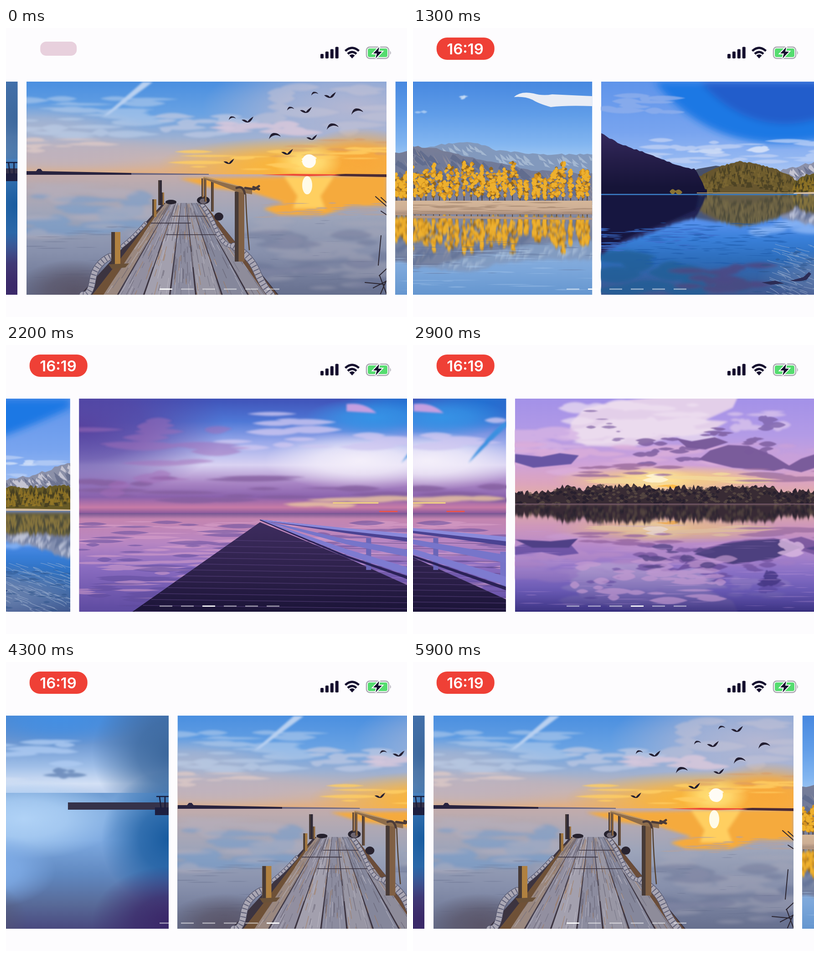
These frames come from a looping animation (880x636 px, 6 s). An HTML page:

```html
<!DOCTYPE html>
<html lang="en">
<head>
<meta charset="utf-8">
<title>Photo carousel</title>
<style>
html, body { margin: 0; width: 100%; height: 100%; overflow: hidden; background: #fdfcfe; }
svg { display: block; }
text { font: 600 33px Inter, Roboto, sans-serif; }
</style>
</head>
<body>
<svg id="stage" width="880" height="636" viewBox="0 0 880 636"></svg>
<script>
const TOP = 118, W = 790, H = 469, PITCH = 809.5, COUNT = 6;
const defs = [];
let uid = 0, seed = 1;

function rng() {
  let s = seed++ * 7919;
  return () => {
    s = (s + 0x6D2B79F5) | 0;
    let t = Math.imul(s ^ (s >>> 15), 1 | s);
    t = (t + Math.imul(t ^ (t >>> 7), 61 | t)) ^ t;
    return ((t ^ (t >>> 14)) >>> 0) / 4294967296;
  };
}
const f = v => v.toFixed(1);
const parse = s => s.split(' ').map(p => p.split(',').map(Number));

// Drawing helpers, each returns markup.
const path = (d, fill, op = 1) => `<path d="${d}" fill="${fill}" opacity="${op}"/>`;
const line = (d, col, w = 1, op = 1, more = 'stroke-linecap="round"') =>
  `<path d="${d}" fill="none" stroke="${col}" stroke-width="${w}" opacity="${op}" ${more}/>`;
const poly = (p, fill, op = 1) => `<polygon points="${p}" fill="${fill}" opacity="${op}"/>`;
const box = (x, y, w, h, fill) => `<rect x="${x}" y="${y}" width="${w}" height="${h}" fill="${fill}"/>`;
const oval = (x, y, rx, ry, fill) => `<ellipse cx="${x}" cy="${y}" rx="${rx}" ry="${ry}" fill="${fill}"/>`;
const soft = (n, s) => `<g filter="url(#soft${n})">${s}</g>`;
const view = (x, y, h, s) => `<svg x="${x}" y="${y}" width="${W}" height="${h}" viewBox="${x} ${y} ${W} ${h}">${s}</svg>`;
const flip = (id, axis, more = 'filter="url(#smear)"') =>
  `<use href="#${id}" transform="matrix(1 0 0 -1 0 ${2 * axis})" ${more}/>`;
const stops = s => s.split(',').map(p => {
  const [c, o] = p.split(' ');
  return `<stop offset="${o}" stop-color="${c}"/>`;
}).join('');

// Gradient running down from y1 to y2.
function down(y1, y2, s) {
  const id = 'g' + uid++;
  defs.push(`<linearGradient id="${id}" gradientUnits="userSpaceOnUse" x1="0" x2="0" y1="${y1}" y2="${y2}">${stops(s)}</linearGradient>`);
  return `url(#${id})`;
}
function glow(x, y, rx, ry, col) {
  const id = 'g' + uid++;
  defs.push(`<radialGradient id="${id}">${stops(`${col} 0,${col}bb .45,${col}00 1`)}</radialGradient>`);
  return oval(x, y, rx, ry, `url(#${id})`);
}
const lens = (x, y, rx, ry) =>
  `M${f(x - rx)} ${f(y)}q${f(rx)} ${f(-2 * ry)} ${f(2 * rx)} 0q${f(-rx)} ${f(2 * ry)} ${f(-2 * rx)} 0z`;

// Random lens shapes inside a box.
function spread(n, x0, y0, x1, y1, rx, ry, fill, op = .8) {
  const r = rng();
  let d = '';
  while (n--) {
    const k = .3 + r();
    d += lens(x0 + (x1 - x0) * r(), y0 + (y1 - y0) * r(), rx * k, ry * (.4 + r()));
  }
  return path(d, fill, op);
}
function heightAt(p, x) {
  let i = 1;
  while (i < p.length - 1 && p[i][0] < x) i++;
  const [a, b] = p[i - 1], [c, d] = p[i];
  return b + (d - b) * (x - a) / (c - a);
}
// Rough skyline closed along a base line.
function ridge(s, rough, step, base, fill) {
  const p = parse(s), r = rng(), x0 = p[0][0], x1 = p[p.length - 1][0];
  let d = `M${x0} ${base}`;
  for (let x = x0; x <= x1; x += step) d += `L${x} ${f(heightAt(p, x) + (r() - .5) * rough)}`;
  return path(d + `H${x1}V${base}z`, fill);
}
// Shards hanging under a skyline: rock faces or tree tops.
function shards(s, n, depth, shape, fill, op = .65) {
  const p = parse(s), r = rng(), x0 = p[0][0], span = p[p.length - 1][0] - x0;
  let d = '';
  while (n--) {
    const x = x0 + span * r();
    d += `M${f(x)} ${f(heightAt(p, x) + depth * r())}${shape}`;
  }
  return path(d, fill, op);
}

function sunsetJetty() {
  let s = box(45, 118, W, 205, down(118, 322, '#4a8fe0 0,#69a2e3 .35,#9bb0d3 .6,#cdb5ab .82,#e2ae80 1'))
    + glow(760, 175, 330, 120, '#b4b7d2') + glow(60, 225, 250, 60, '#a9b5d0') + glow(110, 280, 330, 45, '#bfb2bd')
    + soft(2, spread(34, 40, 150, 330, 240, 60, 6, '#c3d5ee', .5) + spread(14, 330, 190, 520, 235, 45, 6, '#b9c6e2')
    + spread(12, 470, 200, 660, 235, 45, 6, '#dccadb') + spread(14, 560, 130, 830, 230, 60, 9, '#c6c3d5', .5)
    + spread(12, 45, 245, 210, 272, 50, 4, '#dcc9c6') + path('M214 194L300 119H322L226 190z', '#b9d0f0'))
    + glow(665, 300, 330, 62, '#ffb52c') + glow(780, 290, 140, 70, '#f8a83a') + glow(663, 295, 75, 42, '#ffe27c')
    + soft(1, spread(20, 400, 262, 835, 312, 55, 3, '#ffcf62') + spread(12, 600, 240, 835, 285, 35, 3, '#d99a62', .5))
    + oval(665, 293, 15, 15, '#fffdf5') + spread(6, 655, 282, 675, 304, 11, 5, '#fffdf5');

  s += box(45, 322, W, 265, down(322, 587, '#c3acab 0,#b2a9b3 .14,#9ca4ba .36,#8790ac .65,#666f8e 1'))
    + soft(3, spread(22, 60, 370, 330, 450, 65, 10, '#6f9bd0', .5) + spread(20, 50, 335, 340, 470, 60, 7, '#b6afbd', .5)
    + spread(28, 560, 410, 835, 580, 65, 9, '#a9a8b9', .4) + spread(20, 540, 450, 835, 580, 60, 9, '#656f91', .4)
    + poly('380,331 835,325 835,392 760,392 695,412 600,412 565,398 610,384 540,362 450,352', '#f5aa3e')
    + poly('610,326 720,326 690,370 700,397 630,397 640,370', '#ffcf60'))
    + spread(40, 560, 385, 835, 420, 28, 1.6, '#b7a29c', .6) + spread(70, 50, 420, 835, 580, 30, 1, '#59617f', .25)
    + oval(661, 346, 11, 20, '#fffbe8') + glow(150, 580, 130, 70, '#5a5568')
    + path('M45 315H66l4-5h6l4 5 195 4v4H45z', '#28233f') + path('M275 319l170 2v2H275z', '#6c6680')
    + path('M700 323l45-2 90 1v6l-100-2z', '#4b2b35') + path('M560 323l70-2 90 1 15 2-70 2z', '#ee4a38');

  // Deck planks fan out between two edges.
  const r = rng();
  const pt = (u, v) => f(350 + 80 * u + v * (320 * u - 160)) + ',' + f(385 + 202 * v);
  s += poly('345,385 433,385 598,587 163,587', '#3c3440');
  ['#9a8880', '#928fa0', '#a3a0ae', '#8c8c9f', '#9896a4', '#85879b', '#8e8c9a'].forEach((c, i) => {
    const a = i / 7, b = a + .134;
    s += poly([pt(a, 0), pt(b, 0), pt(b, 1), pt(a, 1)].join(' '), c);
  });
  for (const col of ['#5a5566', '#c2bfca', '#a57852', '#6d6b7e']) {
    let d = '';
    for (let i = 0; i < 75; i++) { const u = r(), v = r(); d += `M${pt(u, v)}L${pt(u, Math.min(1, v + .05 + r() * .12))}`; }
    s += line(d, col, 1.3, .6);
  }
  s += line(`M${pt(.3, .145)}L${pt(1, .145)}M${pt(0, .22)}L${pt(.6, .22)}M${pt(.3, .345)}L${pt(1, .345)}`, '#3a3340', 1.6)
    + poly('330,405 337,400 214,587 190,587', '#6f5137') + poly('428,385 434,385 595,587 570,587', '#6b4d39');

  const rope = (d, w) => line(d, '#4d4f68', w + 2) + line(d, '#aaa7b4', w) + line(d, '#5f6078', w - 1, 1, 'stroke-dasharray="2 7"');
  s += rope('M306 430Q280 460 255 480', 6) + rope('M228 503Q195 520 190 555T168 587', 13)
    + rope('M428 386Q448 410 462 445T500 480', 8) + rope('M500 480Q535 500 550 535T582 587', 14)
    + oval(362, 383, 12, 5, '#25212d') + oval(433, 379, 14, 9, '#25212d') + oval(433, 381, 8, 6, '#6d6570') + oval(467, 415, 10, 9, '#28232f');
  const post = (x, y, w, h, c) => box(x, y, w, h, c) + box(x, y, w * .4, h, '#463a37');
  s += post(334, 335, 8, 55, '#302a36') + post(342, 362, 5, 27, '#9d7340') + post(321, 377, 9, 39, '#a1763e')
    + post(429, 331, 5, 42, '#9a7045') + post(435, 328, 5, 54, '#8d6740') + post(450, 336, 6, 68, '#69503c')
    + post(231, 449, 20, 78, '#b08140') + poly('225,520 270,518 262,527 232,530', '#6a5138') + post(502, 360, 21, 154, '#806044')
    + poly('433,327 440,328 540,355 540,366 505,360 434,332', '#8e6d4b') + line('M434 328L538 355', '#c69f6c', 2)
    + line('M506 352Q520 346 524 364M525 352l20 3 10-7M543 350l12 5', '#4b3b38', 5) + line('M526 366Q528 430 534 488', '#54402f', 2.5);

  const bird = (d, list) => parse(list).map(([x, y, k]) =>
    `<path d="${d}" fill="#221d30" transform="translate(${x} ${y}) scale(${k})"/>`).join('');
  return s + bird('M-13 1q8-2 13 4q5-7 13-11q-6 14-13 13q-6 0-13-6z', '711,147,1 658,180,1 530,201,1 671,240,.9 617,272,1 489,293,.9')
    + bird('M-12 8q3-15 12-14q9 0 14 8q-7-4-13-3q-9 2-13 9z', '677,144,.6 624,177,.6 770,183,1 716,216,1 496,198,.6 589,237,1')
    + line('M835 392L811 371M835 384l-12-11M835 411l-12-8M817 522l6-65M788 560l42 4M835 530l-16 15M835 585l-15-40M822 585l12-28M806 572l29-15', '#2b2530', 2);
}

function goldenTrees() {
  const far = '590,268 640,256 690,252 720,255 760,270 850,278 969,278';
  const near = '179,276 210,268 330,266 370,256 390,259 430,246 512,243 560,258 620,264 680,280 760,297 830,312 969,322';
  const hills = ridge(far, 4, 8, 390, '#8299bd') + shards(far, 60, 18, 'l16 14l-12-3z', '#c5d5e6', .5)
    + ridge(near, 4, 8, 390, down(243, 390, '#7d8096 0,#707a99 .4,#7d8199 1'))
    + shards(near, 130, 75, 'l22 20l-8 2l-20-12z', '#515e84', .5) + shards(near, 90, 60, 'l15 22l-6-4z', '#a39a9c', .55);
  const r = rng(), cols = ['#92661f', '#d5931f', '#eeb02d'], leaf = ['', '', ''];
  let trunks = '';
  for (let x = 182; x < 970; x += 8 + r() * 9) {
    const thin = x > 600 && r() < .45, h = 48 + r() * 42, w = thin ? 6 : 10 + r() * 8, base = 381 + r() * 5;
    trunks += `M${f(x)} ${f(base)}l${f(r() * 5 - 2)} ${f(-h * .6)}`;
    for (let i = 0; i < 42; i++) {
      const v = r(), k = Math.sin(Math.PI * (.12 + v * .85));
      leaf[i % 3] += lens(x + (r() + r() - 1) * w * k, base - h + v * h * .82, 3 + r() * 2, 2 + r() * 3);
    }
  }
  const wood = line(trunks, '#4c3728', 1.6) + leaf.map((d, i) => path(d, cols[i])).join('');
  return box(179, 118, W, 290, down(118, 300, '#4788e0 0,#609de8 .4,#82b5f0 .75,#a9cdf3 1'))
    + soft(1, spread(5, 400, 128, 412, 136, 9, 4, '#cfe2f8') + spread(5, 680, 150, 692, 156, 9, 3, '#e3edf9')
    + spread(6, 275, 248, 310, 258, 9, 3, '#d5e5f8') + spread(5, 585, 182, 606, 186, 9, 2, '#b5d2f4'))
    + path('M797 152Q812 138 840 144Q860 150 881 146L969 150V172Q910 170 878 174Q850 166 838 158Q820 150 797 152z', '#e9edf5')
    + `<g id="hills">${hills}</g><g id="wood">${wood}</g>`
    + box(179, 380, W, 32, down(380, 412, '#d5b799 0,#cdae95 .6,#9b8275 1')) + spread(60, 179, 384, 969, 408, 35, 1.2, '#a98b74')
    + box(179, 411, W, 176, down(411, 587, '#a6bedf 0,#8eb2df .4,#7ba6da .7,#6596cf 1'))
    + view(179, 410, 177, flip('hills', 394, 'opacity=".85" filter="url(#smear)"') + flip('wood', 395))
    + spread(70, 179, 490, 969, 580, 45, 1.2, '#a6c6ea', .4) + spread(60, 179, 470, 969, 545, 35, 1.4, '#5f7099', .4)
    + path('M179 408q350 4 790 10v4q-500-4-790-10z', '#b49681') + line('M430 382q18 12 28 26', '#4a3728', 1.6);
}

function blueLake() {
  const left = '48,232 90,255 190,292 225,306 256,311 272,345 280,365';
  const mid = '252,350 258,330 300,307 350,293 390,299 430,310 470,328 484,362';
  const snow = '440,314 500,298 570,287 610,293 660,285 700,296 750,288 838,259';
  const wood = '470,340 490,324 560,320 620,314 838,311';
  const fir = 'l-4 14h8z';
  const land = poly('225,325 260,310 300,303 340,310 340,365 225,365', '#47506a')
    + ridge(snow, 6, 7, 365, '#8b90a8') + shards(snow, 90, 28, 'l14 18l-7-3l-10-6z', '#e4e1ea') + shards(snow, 90, 34, 'l16 14l-9 3z', '#5c6484')
    + ridge(mid, 3, 4, 365, '#67562e') + shards(mid, 230, 42, fir, '#40391f') + shards(mid, 160, 36, fir, '#8a7336', .55)
    + ridge(wood, 8, 4, 363, '#675a26') + shards(wood, 260, 32, fir, '#383420') + shards(wood, 180, 30, fir, '#a98628')
    + ridge(left, 3, 6, 365, down(232, 350, '#34295c 0,#241d48 .5,#161438 1'));
  const r = rng();
  let d = '';
  for (let i = 0; i < 230; i++) {
    d += `M${f(410 + r() * 428)} ${f(475 + r() * 110)}q12 ${f(1 + r() * 5)} ${f(16 + r() * 22)} ${f(8 + r() * 5)}`;
  }
  return box(48, 118, W, 250, down(118, 340, '#5f94ea 0,#78a4ef .5,#98baf2 .8,#c3d5f5 1'))
    + soft(8, path('M165 118Q270 250 430 253T838 138V118z', '#1c78e4') + path('M265 118Q340 205 440 211T690 118z', '#235dcb'))
    + soft(1, spread(14, 60, 148, 210, 192, 42, 5, '#8eaeec') + spread(24, 140, 245, 440, 295, 38, 4, '#bfd0f4')
    + spread(22, 450, 245, 838, 292, 40, 4, '#b7cdf6') + spread(5, 375, 262, 415, 270, 22, 5, '#e1e9f9')
    + spread(5, 250, 264, 310, 274, 24, 5, '#d5e0f7') + spread(5, 690, 254, 770, 268, 24, 4, '#d5e3f9'))
    + `<g id="land">${land}</g>`
    + box(48, 365, W, 222, down(365, 587, '#5c8ce0 0,#5590ec .28,#397fd8 .45,#2d6dbb .65,#355f9f .85,#42588f 1'))
    + soft(3, spread(24, 380, 410, 838, 450, 45, 7, '#8eb8f5') + spread(14, 60, 500, 400, 580, 70, 14, '#1f5f96')
    + spread(16, 220, 520, 400, 585, 40, 9, '#51467f') + glow(640, 545, 250, 65, '#6f84ae'))
    + view(48, 365, 222, flip('land', 365, 'opacity=".88" filter="url(#smear)"')
    + soft(2, poly('48,366 262,366 255,400 200,425 130,450 48,490', '#191640')))
    + spread(60, 50, 440, 290, 490, 22, 1.3, '#3d6fcb') + spread(110, 130, 425, 470, 520, 20, 1.1, '#1d58a8', .5)
    + line(d, '#a9bad6', 1.2, .55) + spread(90, 390, 490, 838, 585, 12, 2, '#2d5387', .5)
    + path('M462 556q18-4 30-8l12-11 5 4-10 13q-18 6-37 2zM400 560l30-4 20 6-30 3z', '#2c2c55') + line('M675 560l24-20', '#38528a', 3)
    + box(48, 365, 430, 2.5, '#3b7fc7') + path('M470 362q180-5 368 0v3H470z', '#d5bda0') + path('M258 362h214v2H258z', '#a8926a')
    + spread(7, 204, 357, 220, 362, 6, 4, '#a98b32');
}

function violetPier() {
  const bar = (a, b, w, c) => poly(`-190,384 0,${a} 203,${b} 203,${b + w} 0,${a + w * .6} -190,386`, c);
  let d = '';
  for (let y = 430; y < 587; y += 13) d += `M${-190 - (y - 390) * 1.4} ${y}L203 ${y + 8}`;
  return box(-587, 118, W, 252, down(118, 370, '#3f52b8 0,#4f78d6 .2,#9aa9ea .38,#d9d2f2 .58,#a884c4 .74,#8a62ac .86,#c77ba6 .95,#8b5a9c 1'))
    + glow(-587, 180, 320, 160, '#57439f') + glow(150, 125, 150, 60, '#2370d2') + glow(60, 160, 150, 45, '#3593e6') + glow(30, 255, 210, 65, '#f4effa')
    + soft(2, spread(20, -300, 150, 203, 230, 55, 6, '#cfc7f0') + spread(24, -587, 285, 203, 345, 80, 5, '#85609f')
    + spread(10, -100, 335, 203, 355, 80, 4, '#eac5a0') + spread(20, -587, 140, -200, 350, 70, 8, '#a46fb8', .5)
    + path('M203 180Q150 230 120 260Q160 200 203 165z', '#3a90e0') + path('M0 130Q40 125 66 150L0 146z', '#c49fe0'))
    + box(-30, 346, 100, 3, '#f0d080') + box(72, 365, 40, 2.5, '#f4523f')
    + box(-587, 370, W, 217, down(370, 587, '#755592 0,#c485b0 .06,#b886c2 .3,#8a6cc0 .55,#5d4aa0 1'))
    + spread(120, -587, 385, 203, 560, 60, 3, '#dba3cc', .5) + spread(120, -587, 390, 203, 585, 50, 4, '#5f4a9c', .5)
    + poly('-190,390 0,468 203,560 203,587 -470,587', down(390, 587, '#3d2c5e 0,#2c2049 .6,#1b1438 1')) + line(d, '#5a4480', 1.5, .6)
    + box(43, 425, 11, 70, '#6a66b8') + box(190, 455, 13, 82, '#7673c8')
    + bar(404, 425, 17, '#4a4292') + bar(403, 422, 10, '#8a89da') + bar(428, 462, 18, '#7775ca') + bar(449, 510, 20, '#7e7bd0') + bar(463, 532, 8, '#2b2257');
}

function purpleClouds() {
  const trees = '222,324 290,324 330,311 375,318 405,307 440,312 500,310 545,318 600,313 740,312 772,306 800,320 880,322 930,317 1012,308';
  const dark = '#7a5b9b';
  const sky = box(222, 118, W, 233, down(118, 350, '#a391e8 0,#b39be6 .35,#cfa2d8 .62,#dca4bd .8,#e5b49a 1'))
    + soft(2, poly('340,205 345,170 375,140 440,124 560,112 712,112 700,138 640,165 690,168 640,195 560,205 470,225 380,222', '#e3cfe9')
    + spread(45, 350, 125, 690, 215, 45, 8, '#f0e1f1', .7) + spread(20, 222, 175, 350, 235, 45, 6, '#d6b3e4')
    + spread(30, 240, 215, 680, 280, 55, 6, '#dbaeda') + spread(14, 700, 140, 810, 190, 30, 7, '#d9c3ec')
    + spread(22, 700, 215, 1000, 285, 45, 6, '#c9a0da') + spread(6, 952, 118, 966, 145, 10, 6, '#dac5ee'))
    + glow(560, 296, 260, 32, '#f6cf82') + glow(530, 296, 90, 26, '#ffe395') + spread(22, 420, 280, 760, 305, 60, 3, '#f3d99b')
    + spread(5, 510, 288, 540, 302, 22, 5, '#fff7da') + spread(4, 540, 309, 570, 313, 20, 3, '#ffb638')
    + soft(1, poly('625,252 650,232 690,220 735,222 785,242 828,268 790,277 700,270', dark)
    + poly('812,272 850,250 925,226 965,235 985,246 950,262 900,264 850,280', dark)
    + poly('222,240 280,246 320,238 362,243 345,262 262,270 222,258', '#6757a4')
    + poly('575,205 610,212 660,203 690,214 640,230 600,226', dark)
    + spread(18, 480, 205, 620, 262, 20, 5, dark) + spread(14, 765, 160, 800, 185, 16, 8, '#7d65ab')
    + spread(8, 640, 180, 685, 200, 18, 4, dark) + spread(10, 730, 205, 780, 240, 16, 6, dark)
    + spread(8, 385, 140, 460, 225, 16, 3, '#8d70ac') + spread(14, 380, 262, 560, 296, 40, 3, '#9a6c9d')
    + spread(12, 740, 270, 1012, 300, 55, 4, '#a1749f') + spread(10, 985, 125, 1012, 270, 18, 6, dark));
  const wood = ridge(trees, 13, 4, 351, '#382b34') + shards(trees, 240, 34, 'q5-5 9 0q-4 6-9 0z', '#625247') + shards(trees, 200, 34, 'q4-7 9 0q-4 7-9 0z', '#211b2b');
  return `<g id="dusk">${sky}</g><g id="grove">${wood}</g>` + box(222, 351, W, 236, '#3c3486')
    + view(222, 350, 237, flip('dusk', 351, '')
    + box(222, 350, W, 237, down(350, 587, '#a877b810 0,#9360ae44 .3,#6c4dab70 .55,#4c3e9cb0 .8,#332b79ee 1'))
    + soft(1, poly('615,460 680,438 740,430 800,428 850,445 790,470 700,482', '#4e417f') + poly('222,428 300,432 360,426 340,446 260,446', '#4f3f86')
    + spread(45, 350, 470, 690, 565, 34, 6, '#c69bd2', .65) + spread(14, 790, 428, 850, 458, 20, 7, '#dbb9e2')
    + spread(12, 500, 440, 660, 490, 22, 6, '#564586') + spread(10, 765, 500, 800, 530, 16, 8, '#413581')
    + spread(12, 890, 430, 970, 455, 30, 7, '#4f4287')) + flip('grove', 350))
    + spread(90, 222, 390, 1012, 580, 40, 1.2, '#c39bdc', .25) + box(222, 349, W, 2, '#6d5365');
}

function longPier() {
  let s = box(298, 118, W, 172, down(118, 290, '#4f83c8 0,#6b97d2 .35,#a0bfe8 .65,#d3e0f5 .87,#b9cdec 1'))
    + glow(330, 120, 270, 130, '#474c83') + glow(320, 225, 260, 35, '#566a9c') + glow(850, 125, 200, 60, '#448fe3') + glow(1100, 200, 180, 160, '#39659a')
    + soft(2, spread(16, 500, 170, 890, 230, 75, 5, '#aecbf2') + spread(14, 300, 240, 800, 270, 80, 4, '#d3dff3')
    + spread(8, 300, 216, 500, 232, 75, 3, '#474f80') + spread(4, 560, 238, 630, 241, 40, 2, '#5d749f')
    + spread(8, 840, 228, 885, 250, 24, 5, '#6284b4') + spread(5, 300, 274, 350, 280, 26, 2, '#5b7099')
    + spread(12, 420, 270, 880, 284, 70, 3, '#c9d8ef'))
    + box(298, 288, W, 299, down(288, 587, '#6e9cd2 0,#81ade0 .12,#7da9e0 .35,#6088c0 .6,#586a98 .82,#49497f 1'))
    + glow(770, 345, 210, 90, '#b0d2f6') + glow(700, 460, 140, 80, '#82afea') + glow(620, 575, 160, 110, '#55576f')
    + glow(1090, 390, 150, 150, '#175a9e') + glow(1090, 570, 170, 120, '#3a2768') + glow(390, 310, 200, 28, '#4f73aa');
  // Curved sea wall, beacon and far stub.
  let d = '';
  for (let i = 0; i < 13; i++) d += `M${536 + i * 8} ${300 - i * .5}v${f(75 - i * 4.2)}`;
  s += path('M528 300Q590 288 640 290V322Q588 332 567 372Q562 405 567 436L581 440 584 480 602 486V527L580 530 583 587H545L520 420 514 330z', '#40383f')
    + path('M590 335Q565 360 566 410L570 436 556 430Q545 360 590 335z', '#655352')
    + line(d, '#79655d', 1.4) + path('M526 302Q580 290 638 290v5Q570 295 530 312z', '#877d84')
    + box(540, 437, 40, 24, '#2c262e') + box(560, 486, 42, 40, '#2d2630') + box(545, 455, 38, 4, '#6b5751') + box(552, 482, 48, 6, '#5d4d4d') + box(604, 310, 37, 14, '#4f4650')
    + line('M616 290l2-18M626 290l-2-18M631 290v-4', '#33303e', 2.4) + path('M616 276V265l4.500-4 4.500 4v11z', '#3d3440')
    + box(867, 309, 221, 16, '#35324a') + box(1058, 320, 30, 17, '#1d1f40') + line('M1062 296h26M1068 296l3 24M1080 296v24', '#171b3a', 2.6);

  // Deck boards meet at one far point.
  const rim = parse('298,368 298,386 298,412 298,440 298,474 298,528 298,587 330,587 385,587 443,587 500,587');
  const tones = ['#4f5876', '#5d6684', '#565f80', '#64698a', '#55597c', '#5c6083', '#5c6083', '#616587', '#575b7d', '#66698a'];
  tones.forEach((c, i) => { s += poly(`522,302 ${rim[i]} ${rim[i + 1]} 526,302`, c); });
  s += poly('522,302 530,302 519,420 545,587 500,587', '#595261');
  const r = rng();
  for (const c of ['#8d93ac', '#424866', '#7a87ad']) {
    let g = '';
    for (let i = 0; i < 80; i++) {
      const e = rim[1 + Math.floor(r() * 9)], x = e[0] + r() * 50, y = e[1] - r() * 25, k = .1 + r() * .85, m = Math.max(0, k - .08 - r() * .1);
      g += `M${f(x + (524 - x) * k)} ${f(y + (302 - y) * k)}L${f(x + (524 - x) * m)} ${f(y + (302 - y) * m)}`;
    }
    s += line(g, c, 1.2, .5);
  }
  rim.forEach(([x, y], i) => { if (i && i !== 6) s += poly(`523,302 ${x},${y} ${x + (i > 6 ? 6 : 0)},${y + (i > 6 ? 0 : 5)}`, '#282b45'); });
  d = '';
  for (let i = 0; i < 11; i++) { const x = 316 + 205 * (1 - Math.pow(.8, i)); d += `M${f(x)} ${f(307 - (x - 298) * .06)}V${f(350 - (x - 298) * .23)}`; }
  return s + poly('413,432 440,398 432,478 392,480', '#6288b8', .6) + poly('440,398 462,372 448,430 432,460', '#658bb9', .5)
    + path('M298 354L420 320 525 296 528 302 420 331 298 370z', '#2b2c45') + line('M298 308Q420 300 530 292M298 328Q420 310 530 294', '#8798b9', 1.4)
    + line(d, '#a9a5b2', 2) + line('M521 400Q526 500 545 587', '#b9bfd6', 10) + line('M519 400Q525 500 543 587', '#e9ecf6', 6)
    + path('M527 293Q508 330 518 400Q530 480 558 587H582Q550 480 536 405Q514 345 531 293z', '#c2c9df')
    + path('M527 293Q509 330 519 400Q530 480 559 587H576Q546 480 531 405Q513 345 530 293z', '#eef1f9')
    + oval(529, 411, 10, 9, '#dfe4f1') + oval(534, 519, 11, 8, '#dde2f0');
}

function statusIcons() {
  const ink = '#150f2e';
  let s = '';
  for (let i = 0; i < 4; i++) s += `<rect x="${690 + i * 10.9}" y="${57 - i * 5.2}" width="7" height="${10 + i * 5.2}" rx="1.8" fill="${ink}"/>`;
  return s + line('M744.5 50.5Q759.5 37 774.5 50.5M750 57Q759.5 48.5 769 57', ink, 4.8, 1, '') + path('M753.5 60.5q6-5 12 0l-6 6.5z', ink)
    + '<rect x="791" y="42" width="49" height="25" rx="7" fill="#fff" stroke="#a9a7b0" stroke-width="2.4"/><rect x="794" y="45" width="43" height="19" rx="4" fill="#55dc6f"/>'
    + path('M843 50q3.5 4.5 0 9z', '#a9a7b0')
    + `<path d="M819 42L806 56h8l-3 11 14-15h-8z" fill="${ink}" stroke="#fff" stroke-width="4" paint-order="stroke"/>`;
}

// Each scene is drawn in its own frame, starting at the given left edge.
const scenes = [[sunsetJetty, 45], [goldenTrees, 179], [blueLake, 48], [violetPier, -587], [purpleClouds, 222], [longPier, 298]];
const slides = scenes.map(([draw, left]) =>
  `<g class="slide"><svg y="${TOP}" width="${W}" height="${H}" viewBox="${left} ${TOP} ${W} ${H}">${draw()}</svg></g>`).join('');
const blur = (id, dev) => defs.push(`<filter id="${id}"><feGaussianBlur stdDeviation="${dev}"/></filter>`);
[1, 2, 3, 8].forEach(n => blur('soft' + n, n));
blur('smear', '.4 3');
let marks = '';
for (let i = 0; i < COUNT; i++) marks += `<rect class="mark" x="${337 + 47 * i}" y="573.3" width="28" height="2.7" fill="#fff"/>`;

const stage = document.getElementById('stage');
stage.innerHTML = `<defs>${defs.join('')}</defs>${box(0, 0, 880, 636, '#fdfcfe')}${slides}${marks}${statusIcons()}
  <rect id="pill"/><text id="clock" x="114.5" y="57.5" text-anchor="middle" fill="#fff">16:19</text>`;
const slideEls = [...stage.querySelectorAll('.slide')], markEls = [...stage.querySelectorAll('.mark')];
const pill = document.getElementById('pill'), clock = document.getElementById('clock');

const LOOP = 6000, TICK = 100, DELAY = 190, PERIOD = 745, MOVE = 690;
const clamp = v => Math.max(0, Math.min(1, v));
const mix = (a, b, k) => a + (b - a) * k;

function render(t) {
  let scroll = 0, settled = 0;
  for (let i = 0; i < COUNT; i++) {
    const u = clamp((t - DELAY - i * PERIOD) / MOVE);
    scroll += (1 - Math.cos(Math.PI * u)) / 2;
    if (u === 1) settled++;
  }
  slideEls.forEach((el, i) => {
    const x = 45 + ((i - scroll + 9) % COUNT - 3) * PITCH;
    el.style.display = x > -W && x < 880 ? '' : 'none';
    el.setAttribute('transform', `translate(${x.toFixed(2)} 0)`);
  });
  markEls.forEach((el, i) => el.setAttribute('opacity', i === settled % COUNT ? 1 : .5));

  const k = clamp(t / 200), w = mix(80, 127, k), h = mix(31, 49, k);
  const attrs = { x: 115.2 - w / 2, y: 45.5 - h / 2, width: w, height: h, rx: mix(13, 23, k),
    fill: `rgb(${mix(232, 239, k)},${mix(208, 64, k)},${mix(221, 54, k)})` };
  for (const a in attrs) pill.setAttribute(a, attrs[a]);
  clock.setAttribute('opacity', k);
}

let shown = -1;
const start = performance.now();
function frame() {
  const t = Math.floor((performance.now() - start) % LOOP / TICK) * TICK;
  if (t !== shown) render(shown = t);
  requestAnimationFrame(frame);
}
frame();
</script>
</body>
</html>
```
